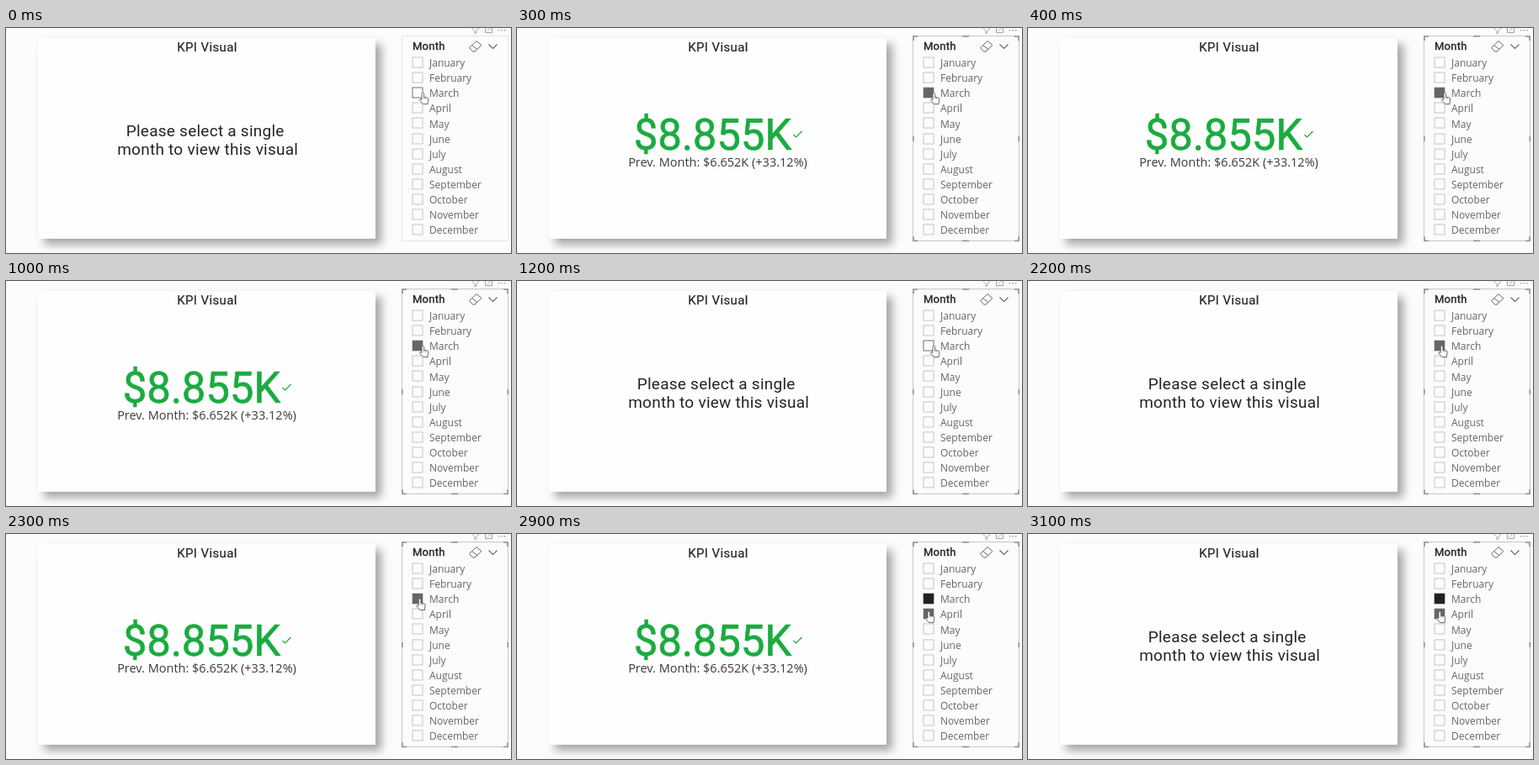
An HTML page with a canvas that plays this animation: 600 px wide and 268 px high, repeating every 3800 ms.

```html
<!DOCTYPE html>
<html lang="en">
<head>
<meta charset="utf-8">
<title>KPI Visual</title>
<style>
html, body { margin: 0; width: 100%; height: 100%; overflow: hidden; background: #fdfbfd; }
canvas { display: block; }
</style>
</head>
<body>
<canvas id="stage" width="600" height="268"></canvas>
<script>
const ctx = document.getElementById('stage').getContext('2d');
const LOOP = 3800;
const DIN = 'Roboto, sans-serif';
const UI = '"Open Sans", "Noto Sans", sans-serif';
const MONTHS = ['January', 'February', 'March', 'April', 'May', 'June', 'July',
  'August', 'September', 'October', 'November', 'December'];
const MARCH = 2, APRIL = 3;
const HAND = new Path2D('M3 8.5V1.6a1.3 1.3 0 0 1 2.6 0V5.2l4 .9q1.5.5 1.3 2L10.2 11.2V13.6H4.5L.9 9.4Q.2 7.9 1.6 7.6z');

// "bold" thickens the glyphs by that many pixels
function text(str, x, y, font, color, { spacing = 0, align = 'left', bold = 0 } = {}) {
  ctx.font = font;
  ctx.fillStyle = ctx.strokeStyle = color;
  ctx.letterSpacing = spacing + 'px';
  ctx.textAlign = align;
  ctx.fillText(str, x, y);
  if (!bold) return;
  ctx.lineWidth = bold;
  ctx.strokeText(str, x, y);
}

function line(points, color, width = 1, close = false) {
  ctx.beginPath();
  points.forEach(([x, y]) => ctx.lineTo(x, y));
  if (close) ctx.closePath();
  ctx.strokeStyle = color;
  ctx.lineWidth = width;
  ctx.stroke();
}

function rect(x, y, w, h, color) {
  ctx.fillStyle = color;
  ctx.fillRect(x, y, w, h);
}

function card() {
  ctx.save();
  ctx.shadowColor = 'rgba(0,0,0,.34)';
  ctx.shadowBlur = 10;
  ctx.shadowOffsetX = ctx.shadowOffsetY = 7;
  rect(38, 12, 401, 239, '#fefefe');
  ctx.restore();
  text('KPI Visual', 239, 28, '15px ' + DIN, '#252423', { spacing: 0.4, align: 'center', bold: 0.2 });
}

function message() {
  const font = '19px ' + DIN;
  const style = { spacing: 0.25, align: 'center' };
  text('Please select a single', 236.7, 128.5, font, '#252423', style);
  text('month to view this visual', 239.7, 150.5, font, '#252423', style);
}

function kpi() {
  const green = '#1aab40';
  text('$8.855K', 138.7, 145, '51px ' + DIN, green, { spacing: -0.2, bold: 0.6 });
  line([[328.5, 127], [331.5, 130], [338.5, 123]], green, 1.2);
  text('Prev. Month: $6.652K (+33.12%)', 238.5, 165, '14.5px ' + UI, '#3b3a39', { align: 'center' });
}

function panelFrame(selected) {
  ctx.strokeStyle = selected ? '#c8c8c8' : '#e6e6e6';
  ctx.lineWidth = 1;
  ctx.strokeRect(470.5, 9.5, 126, 244);
  if (!selected) return;
  const c = '#909090';
  for (const [x, y, dx, dy] of [[471, 10, 1, 1], [596, 10, -1, 1], [471, 253.5, 1, -1], [596, 253.5, -1, -1]])
    line([[x + 5 * dx, y], [x, y], [x, y + 5 * dy]], c, 1.6);
  for (const x of [470, 595.5]) rect(x, 129, 1.6, 6, c);
  for (const y of [9, 252.7]) rect(529, y, 8, 1.6, c);
}

function icons() {
  const c = '#9a9896';
  line([[553.5, 0], [557, 3.5], [557, 6.5], [559, 5.5], [559, 3.5], [562, 0]], c, 0.9);
  line([[569.5, 0], [569.5, 5.5], [577.5, 5.5], [577.5, 0]], c, 0.9);
  line([[572, 3.5], [575.5, 0]], c, 0.9);
  for (const x of [585, 588.5, 592]) rect(x, 2, 1.4, 1.4, c);
  line([[550.5, 23.5], [559, 15.5], [565, 20.5], [557, 28], [554.5, 28]], '#666', 1, true);
  line([[553.5, 20.5], [560, 25.5]], '#666');
  line([[573.5, 19.5], [578.5, 24.5], [583.5, 19.5]], '#666', 1.1);
}

function list(marchFill, aprilFill) {
  text('Month', 483, 26.3, '13px ' + DIN, '#252423', { spacing: 0.25, bold: 0.4 });
  MONTHS.forEach((name, i) => {
    const y = 41 + i * 18.1;
    const top = Math.round(y) - 6;
    const fill = i === MARCH ? marchFill : i === APRIL ? aprilFill : null;
    if (fill) rect(482.7, top - 0.3, 12.6, 12.6, fill);
    else {
      ctx.strokeStyle = i === MARCH ? '#707070' : '#c6c4c2';
      ctx.lineWidth = 1;
      ctx.strokeRect(483, top, 12, 12);
    }
    text(name, 503, y + 5.1, '12px ' + UI, '#686664');
  });
}

function hand(x, y) {
  ctx.save();
  ctx.translate(x, y);
  ctx.fillStyle = '#fff';
  ctx.fill(HAND);
  ctx.strokeStyle = '#5a5a5a';
  ctx.lineWidth = 0.9;
  ctx.stroke(HAND);
  line([[5.6, 5], [5.6, 7.5]], '#777', 0.7);
  line([[7.6, 5.7], [7.6, 7.8]], '#777', 0.7);
  ctx.restore();
}

function draw(t) {
  const within = (a, b) => t >= a && t < b;
  const both = t >= 2900;
  const gray = '#666';
  const marchOn = within(100, 1200) || t >= 2200;

  rect(0, 0, 600, 268, '#fdfbfd');
  card();
  if (within(200, 1200) || within(2300, 3000)) kpi();
  else message();

  panelFrame(t >= 100);
  icons();
  list(both ? '#222' : marchOn ? gray : null, both ? gray : null);

  if (both) hand(485, 92);
  else hand(t < 1600 ? 491 : t < 1700 ? 489 : 487.3, 77);
}

const start = performance.now();
function tick() {
  draw((performance.now() - start) % LOOP);
  requestAnimationFrame(tick);
}
tick();
</script>
</body>
</html>
```
